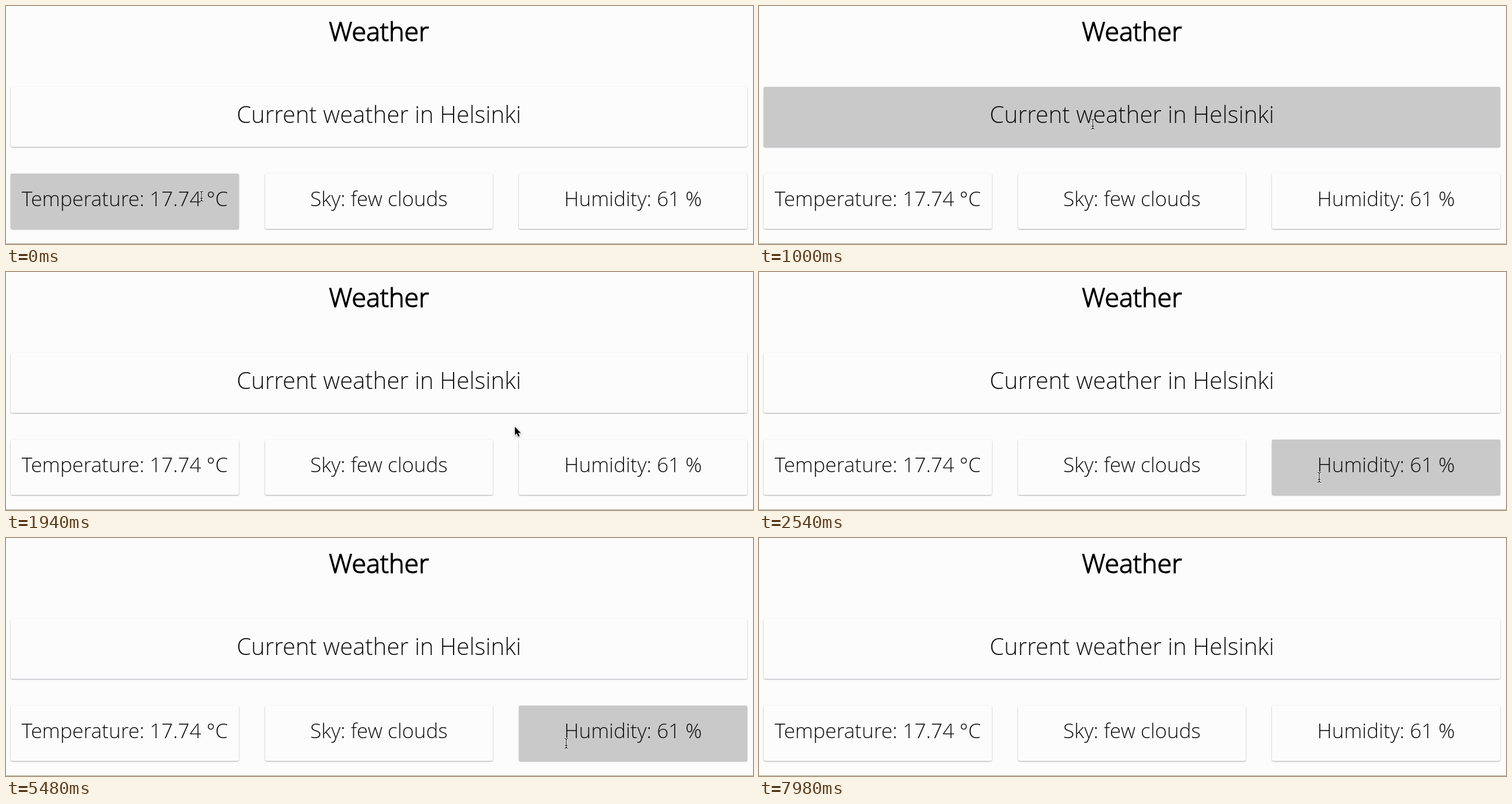
These frames come from a looping animation (1280 px wide and 409 px high, 8 s). An HTML page with a canvas:

```html
<!DOCTYPE html>
<html lang="en">
<head>
<meta charset="utf-8">
<title>Weather</title>
<style>
  html, body { margin: 0; width: 100%; height: 100%; overflow: hidden; background: #fcfcfc; }
  canvas { display: block; }
</style>
</head>
<body>
<canvas id="stage" width="1280" height="409"></canvas>
<script>
const ctx = document.getElementById('stage').getContext('2d');
const LOOP = 8000;
const HOVER_LAG = 60;
const PAPER = '#fcfcfc';

const cards = [
  { x: 8, y: 139, w: 1262, h: 103, size: 40, base: 201, text: 'Current weather in Helsinki', zone: [397, 164, 881, 218] },
  { x: 8, y: 288, w: 391, h: 95, size: 35, base: 344, text: 'Temperature: 17.74 °C', zone: [29, 312, 377, 361] },
  { x: 444, y: 288, w: 390, h: 95, size: 35, base: 344, text: 'Sky: few clouds', zone: [524, 312, 753, 361] },
  { x: 879, y: 288, w: 391, h: 95, size: 35, base: 344, text: 'Humidity: 61 %', zone: [958, 312, 1189, 361] }
];

// Pointer path: time, x, y
const path = [
  [0, 335, 327], [100, 345, 320], [540, 508, 235], [800, 566, 206],
  [1000, 572, 203], [1500, 590, 203], [1940, 872, 266], [2250, 945, 338],
  [2450, 960, 353], [5500, 960, 353], [5760, 959, 375], [6020, 958, 386],
  [6250, 957, 414], [LOOP, 957, 414]
];

function pointerAt(t) {
  const i = Math.max(1, path.findIndex(p => p[0] >= t));
  const [t0, x0, y0] = path[i - 1];
  const [t1, x1, y1] = path[i];
  const k = (t - t0) / (t1 - t0);
  return { x: x0 + (x1 - x0) * k, y: y0 + (y1 - y0) * k };
}

const within = (p, x0, y0, x1, y1) => p.x >= x0 && p.x <= x1 && p.y >= y0 && p.y <= y1;

function label(text, x, y, size) {
  ctx.font = `300 ${size}px "Open Sans", sans-serif`;
  ctx.textAlign = 'center';
  ctx.fillText(text, x, y);
}

function drawTitle() {
  ctx.fillStyle = ctx.strokeStyle = '#000';
  ctx.lineWidth = 1.4;
  ctx.lineJoin = 'miter';
  label('Weather', 639, 59.5, 45);
  ctx.strokeText('Weather', 639, 59.5);
}

function drawCard(card, hovered) {
  ctx.beginPath();
  ctx.roundRect(card.x, card.y, card.w, card.h, 3);
  ctx.fillStyle = hovered ? '#c9c9c9' : PAPER;
  ctx.save();
  ctx.shadowOffsetY = 1;
  for (const [blur, alpha] of [[3, 0.12], [2, 0.24]]) {
    ctx.shadowBlur = blur;
    ctx.shadowColor = `rgba(8, 8, 40, ${alpha})`;
    ctx.fill();
  }
  ctx.restore();
  ctx.fillStyle = '#111';
  label(card.text, card.x + card.w / 2, card.base, card.size);
}

function drawArrow() {
  const shape = new Path2D('M0 0V14.2L3.2 11.3L5.7 17L8.1 16L5.7 10.4H10.2Z');
  ctx.save();
  ctx.shadowColor = 'rgba(0, 0, 0, .35)';
  ctx.shadowBlur = 3;
  ctx.shadowOffsetY = 1;
  ctx.strokeStyle = '#fff';
  ctx.lineWidth = 2;
  ctx.stroke(shape);
  ctx.restore();
  ctx.fillStyle = '#000';
  ctx.fill(shape);
}

function drawBeam() {
  const shape = new Path2D('M-3 -8.5Q0 -8.5 0 -6V6Q0 8.5 -3 8.5M3 -8.5Q0 -8.5 0 -6M0 6Q0 8.5 3 8.5M-2 3.5H2');
  for (const [color, width] of [['#fff', 3], ['#000', 1.1]]) {
    ctx.strokeStyle = color;
    ctx.lineWidth = width;
    ctx.stroke(shape);
  }
}

function draw(t) {
  const pointer = pointerAt(t);
  const hover = pointerAt(Math.max(0, t - HOVER_LAG));
  ctx.fillStyle = PAPER;
  ctx.fillRect(0, 0, 1280, 409);
  drawTitle();
  for (const c of cards) drawCard(c, within(hover, c.x, c.y, c.x + c.w, c.y + c.h));
  ctx.fillStyle = '#aaa594';
  ctx.fillRect(0, 408, 1280, 1);

  ctx.save();
  ctx.translate(Math.round(pointer.x), Math.round(pointer.y));
  if (cards.some(c => within(pointer, ...c.zone))) drawBeam();
  else drawArrow();
  ctx.restore();
}

const start = performance.now();
function tick() {
  draw((performance.now() - start) % LOOP);
  requestAnimationFrame(tick);
}
tick();
</script>
</body>
</html>
```
